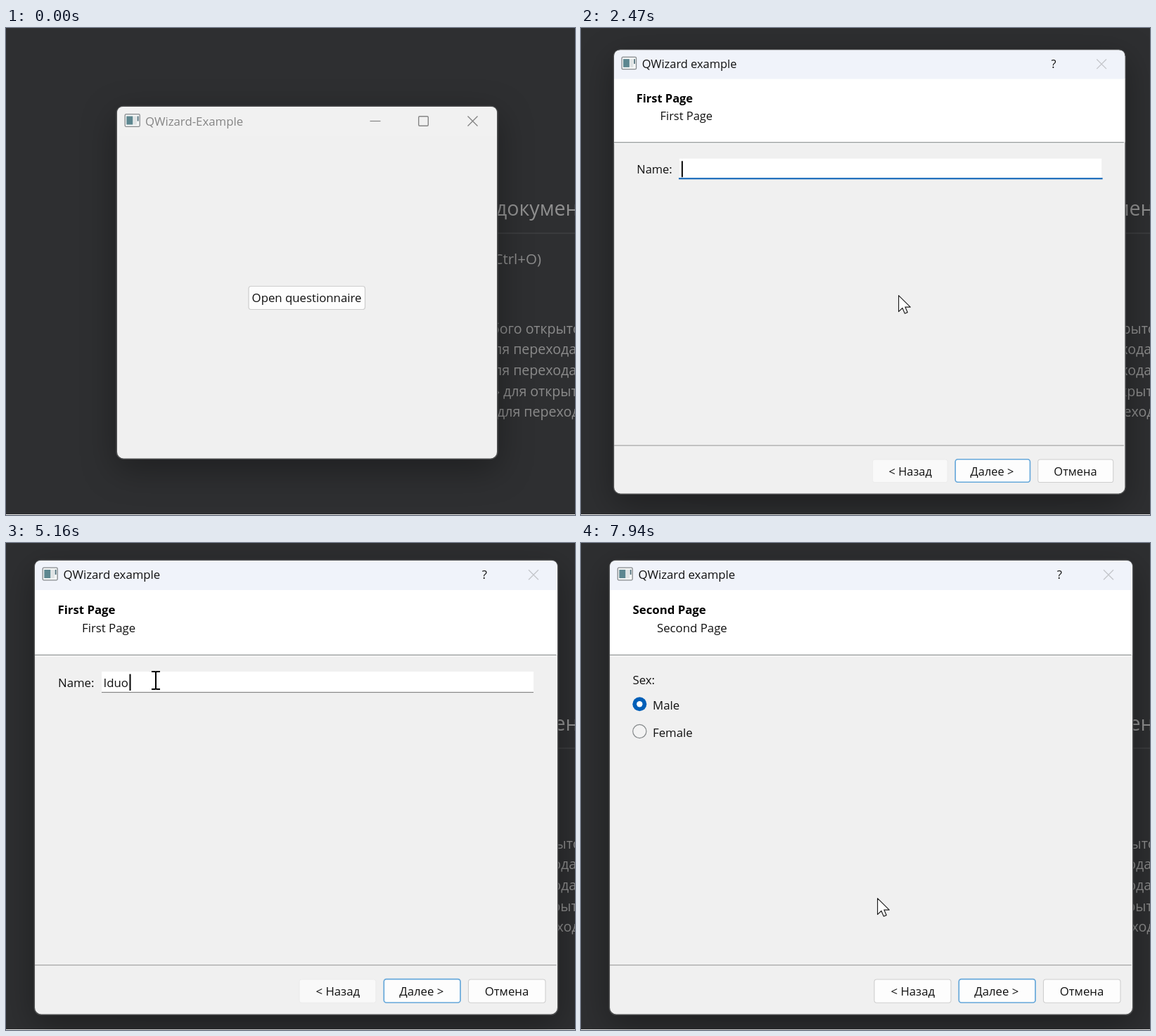
Write an HTML page that moves like this. It is 809 by 693 pixels and loops after 8000 ms.

```html
<!DOCTYPE html>
<html lang="en">
<head>
<meta charset="utf-8">
<title>QWizard example</title>
<style>
html, body { margin: 0; width: 100%; height: 100%; overflow: hidden; background: #2e2f31; }
svg { display: block; width: 809px; height: 693px; }
text { font: 16.8px "Open Sans", "Noto Sans", sans-serif; fill: #111; white-space: pre; }
.bold { font-weight: 700; fill: #000; }
.mid { text-anchor: middle; }
.muted { fill: #858585; }
.doc text { font-size: 19.6px; fill: #8b8b8b; }
.doc .head { font-size: 28.5px; fill: #8f8f8f; }
.frame { filter: drop-shadow(0 14px 24px rgba(0, 0, 0, .34)); }
#wizard { transform-origin: 311px 311px; }
</style>
</head>
<body>
<svg viewBox="0 0 809 693">
  <defs>
    <g id="icon">
      <rect x=".7" y=".7" width="21" height="17.6" rx="1.5" fill="#f4f6f6" stroke="#85898c" stroke-width="1.3"/>
      <rect x="2.8" y="3.5" width="9" height="12" fill="#5d8790"/>
      <rect x="12.8" y="3.5" width="4.5" height="12" fill="#dfe3e4"/>
      <rect x="18.2" y="3.5" width="1.8" height="7" fill="#52707c"/>
    </g>
    <path id="cross" d="M0 0L14 14M14 0L0 14" fill="none" stroke-width="1.3"/>
  </defs>

  <rect width="809" height="693" fill="#2e2f31"/>
  <g class="doc">
    <text class="head" x="696" y="267">документа</text>
    <rect x="600" y="291.5" width="209" height="1" fill="#47484a"/>
    <text x="761" y="336" text-anchor="end" style="font-size:20.5px">Ctrl+O)</text>
    <text x="690" y="435">бого открытого</text>
    <text x="694" y="464">ля перехода</text>
    <text x="694" y="494">ля перехода</text>
    <text x="702" y="524" text-anchor="end">»</text>
    <text x="707" y="524">для открытия</text>
    <text x="698" y="553">для перехода</text>
  </g>
  <rect y="692" width="809" height="1" fill="#e9e9e9"/>

  <g id="main">
    <rect class="frame" x="157.2" y="111.2" width="541.6" height="502" rx="10" fill="#f0f0f0" stroke="#4c4d4e" stroke-width="1.6"/>
    <path id="mainBar" d="M158 154V121q0-9 9-9H689q9 0 9 9V154Z"/>
    <use href="#icon" x="168.5" y="122"/>
    <text class="muted" x="198" y="138.6">QWizard-Example</text>
    <path d="M517.5 132.5h15" stroke="#858585" stroke-width="1.2"/>
    <rect x="586.7" y="125.7" width="13.6" height="13.6" rx="1.5" fill="none" stroke="#858585" stroke-width="1.4"/>
    <use href="#cross" x="656.5" y="125.5" stroke="#808080"/>
    <rect id="open" x="345" y="367.5" width="165.5" height="33" rx="3.5" stroke-width="1.2"/>
    <text class="mid" x="427.5" y="390.4">Open questionnaire</text>
  </g>

  <g id="wizard">
    <rect class="frame" x="40.3" y="24.3" width="744.4" height="647" rx="10" fill="#f0f0f0" stroke="#4c4d4e" stroke-width="1.5"/>
    <path d="M41 67.5V34q0-9 9-9H775q9 0 9 9V67.5Z" fill="#f0f3fa"/>
    <rect x="41" y="67" width="743" height="92" fill="#fff"/>
    <rect x="41" y="158.7" width="741.5" height="1.6" fill="#9b9f9f"/>
    <rect x="41" y="160.3" width="741.5" height="1.3" fill="#fafafa"/>
    <rect x="41" y="600" width="741.5" height="1.2" fill="#a3a3a3"/>
    <use href="#icon" x="51.5" y="34.5"/>
    <text x="81.5" y="51.2">QWizard example</text>
    <text class="mid" x="680.3" y="51.2">?</text>
    <use href="#cross" x="743" y="38.3" stroke="#c3c5ca"/>
    <text class="bold" id="title" x="73.5" y="101"></text>
    <text id="subtitle" x="108" y="127"></text>

    <g id="first">
      <text x="74" y="205">Name:</text>
      <rect x="136" y="183" width="614" height="29.5" fill="#fff"/>
      <rect id="line"/>
      <text id="name" x="138.5" y="205"></text>
      <rect id="caret" y="186.5" width="2" height="23.5" fill="#000"/>
    </g>
    <g id="second">
      <text x="73.5" y="201">Sex:</text>
      <circle cx="83.3" cy="229.3" r="10" fill="#005fb8"/>
      <circle cx="83.3" cy="229.3" r="4.2" fill="#fff"/>
      <text x="102" y="236.5">Male</text>
      <circle cx="83.3" cy="268" r="9.6" fill="#f3f3f3" stroke="#868a8c" stroke-width="1.2"/>
      <text x="102" y="275.5">Female</text>
    </g>

    <rect id="back" x="417" y="621" width="109" height="33.3" rx="3.5" stroke-width="1.1"/>
    <text class="mid" x="471.8" y="644.4">&lt; Назад</text>
    <rect id="next" x="537.3" y="620.7" width="108.7" height="33.3" rx="3.5" stroke-width="1.7"/>
    <text class="mid" x="590.8" y="644.4">Далее &gt;</text>
    <rect x="657.5" y="621" width="109.5" height="33.3" rx="3.5" fill="#fdfdfd" stroke="#cfcfcf" stroke-width="1.1"/>
    <text class="mid" x="712" y="644.4">Отмена</text>
  </g>

  <path id="arrow" d="M.6 .6V23.6L6 18.5L9.4 26.2L13.2 24.6L9.9 17.1H17.3Z" fill="#fff" stroke="#222" stroke-width="1.2" stroke-linejoin="round"/>
  <path id="beam" d="M-6 -12h4.5q1.5 0 1.5 1.5q0-1.5 1.5-1.5h4.5M0 -11V12M-6 13h4.5q1.5 0 1.5-1.5q0 1.5 1.5 1.5h4.5" fill="none" stroke="#000" stroke-width="2"/>
</svg>
<script>
const LOOP = 8000;
const $ = id => document.getElementById(id);
const set = (id, attrs) => {
  for (const k in attrs) $(id).setAttribute(k, attrs[k]);
};
const show = (id, on) => set(id, { visibility: on ? 'visible' : 'hidden' });

// Pointer moves: start, end, number of steps, from, to
const moves = [
  [660, 1410, 12, [705, 680], [451, 380]],
  [2610, 3080, 8, [451, 380], [232, 213]],
  [3160, 3290, 3, [232, 213], [216, 188]],
  [3360, 3560, 3, [216, 188], [213, 195]],
  [5750, 6350, 10, [213, 195], [595, 625]],
  [7140, 7540, 7, [595, 625], [164, 285]],
  [7750, 7940, 4, [164, 285], [421, 505]]
];
// Dialog opening: time, scale, opacity
const opening = [[2400, .94, .6], [2470, .9775, 1], [2540, .993, 1], [2610, 1, 1]];
// Typed letters: time, text, caret x
const typing = [[0, '', 139], [4160, 'I', 145.4], [4420, 'Id', 156], [4890, 'Idu', 166], [5160, 'Iduo', 175.5]];
// Caret blinking: time, visible
const blinks = [[0, 1], [2900, 0], [3430, 1], [3960, 0], [4160, 1], [5750, 0], [6280, 1]];

const last = (table, t) => table.filter(row => row[0] <= t).pop();
const ease = p => p * p * (3 - 2 * p);
const inside = ([x, y], l, t, r, b) => x >= l && x <= r && y >= t && y <= b;

function pointer(t) {
  const move = last(moves, t);
  if (!move) return null;
  const [start, end, steps, from, to] = move;
  const step = Math.floor((t - start) / (end - start) * (steps - 1) + 1.02);
  const p = ease(Math.min(1, step / steps));
  return from.map((v, i) => v + (to[i] - v) * p);
}

function draw(t) {
  const pos = pointer(t);
  const at = pos || [-99, -99];
  const open = last(opening, t);
  const page2 = t >= 6690;

  const overOpen = !open && inside(at, 345, 367, 511, 401);
  const pressed = t >= 2280;
  set('mainBar', { fill: pressed ? '#f3f3f3' : '#f1f1f1' });
  set('open', overOpen
    ? { fill: pressed ? '#dbeaf7' : t < 1470 ? '#eef6fc' : '#e0eef9', stroke: pressed ? '#1a6fb4' : '#2a80c8' }
    : { fill: '#fdfdfd', stroke: '#cdcdcd' });

  show('wizard', !!open);
  $('wizard').style.transform = `scale(${open ? open[1] : 1})`;
  $('wizard').style.opacity = open ? open[2] : 0;

  const title = page2 ? 'Second Page' : 'First Page';
  $('title').textContent = $('subtitle').textContent = title;
  $('first').style.display = page2 ? 'none' : '';
  $('second').style.display = page2 ? '' : 'none';

  const overField = open && !page2 && inside(at, 135, 182, 751, 212);
  set('line', overField
    ? { x: 136, y: 211.9, width: 614, height: 1.2, fill: '#868686' }
    : { x: 135, y: 211, width: 616.5, height: 2.1, fill: '#0b62b6' });
  const [, typed, caretX] = last(typing, t);
  $('name').textContent = typed;
  set('caret', { x: caretX, opacity: last(blinks, t)[1] });

  const overNext = open && inside(at, 537, 621, 646, 654);
  const nextDown = t >= 6550 && t < 6690;
  set('back', page2 ? { fill: '#fdfdfd', stroke: '#cfcfcf' } : { fill: '#f9f9f9', stroke: '#ececec' });
  set('next', {
    fill: nextDown ? '#dbeaf7' : overNext ? '#f3f8fd' : '#fdfdfd',
    stroke: overNext ? '#3f89c8' : '#66a8da'
  });

  show('arrow', pos && !overField);
  show('beam', pos && overField);
  const place = `translate(${at.map(v => v.toFixed(1))})`;
  set('arrow', { transform: place });
  set('beam', { transform: place });
}

const began = performance.now();
function tick() {
  draw((performance.now() - began) % LOOP);
  requestAnimationFrame(tick);
}
tick();
</script>
</body>
</html>
```
